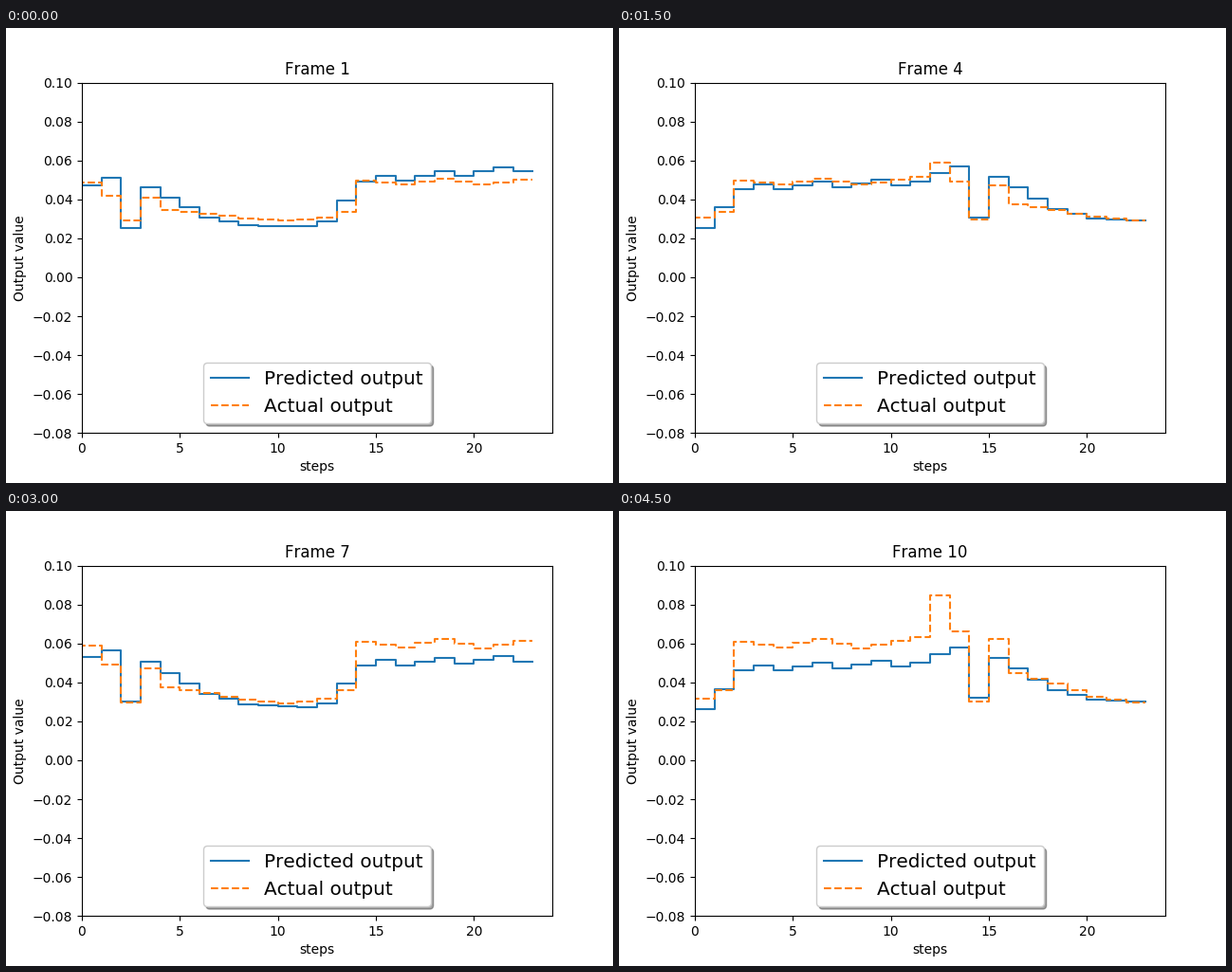
Recreate the animation shown at these times as a matplotlib script. Size 640 by 480 pixels, loop 5 s.

```python
import matplotlib.pyplot as plt
import numpy as np
from matplotlib.animation import FuncAnimation

FRAMES = 10
HOP = 4        # steps the window moves per frame
WINDOW = 24    # points in the window
DAY = 24       # steps in the daily cycle
UNIT = 1e-4

# Key points of the daily cycles: (hour, height)
LOAD = [(1, 300), (2, 200), (3, 5), (4, 180), (5, 85), (7, 55), (9, 20),
        (11, 3), (13, 25), (14, 70), (15, 320), (17, 290), (19, 335),
        (21, 285), (24, 345)]
GUESS = [(1, 540), (2, 572), (3, 308), (4, 512), (7, 341), (9, 288),
         (12, 266), (13, 286), (14, 387), (15, 478), (16, 487), (24, 500)]

# Forecast bias at the near and far end of the window: (run, bias)
NEAR = [(1, -75), (3, -32), (6, -35), (8, 10), (10, -25)]
FAR = [(1, 60), (3, 25), (6, 5), (8, 40), (10, 30)]


def along(points, x):
    return np.interp(x, *zip(*points))


def clock(step):
    """Split steps into day number and hour 1 to 24."""
    day, hour = np.divmod(step - 1, DAY)
    return day, hour + 1


def measured(step):
    day, hour = clock(step)
    gain = 0.65 + 0.1 * day + 0.25 * day ** 2
    return (290 + gain * along(LOAD, hour)) * UNIT


def forecast(step, run):
    _, hour = clock(step)
    ripple = 18 * np.sin(2 * np.pi * hour / 3) * (hour > 15)
    bias = np.linspace(along(NEAR, run), along(FAR, run), WINDOW)
    return (along(GUESS, hour) + ripple + bias) * UNIT


plt.rcParams["text.kerning_factor"] = 6

fig, ax = plt.subplots(figsize=(6.4, 4.8), dpi=100)
steps = np.arange(WINDOW)
predicted, = ax.step(steps, forecast(steps, 1), label="Predicted output")
actual, = ax.step(steps, measured(steps), "--", label="Actual output")
ax.set(xlim=(0, 24), ylim=(-0.08, 0.10), xlabel="steps", ylabel="Output value")
title = ax.set_title("Frame 1")
ax.legend(loc="lower center", shadow=True, fontsize="x-large")


def update(i):
    now = steps + HOP * i
    predicted.set_ydata(forecast(now, i + 1))
    actual.set_ydata(measured(now))
    title.set_text(f"Frame {i + 1}")
    return predicted, actual, title


anim = FuncAnimation(fig, update, frames=FRAMES, interval=500, repeat=True)
plt.show()
```
